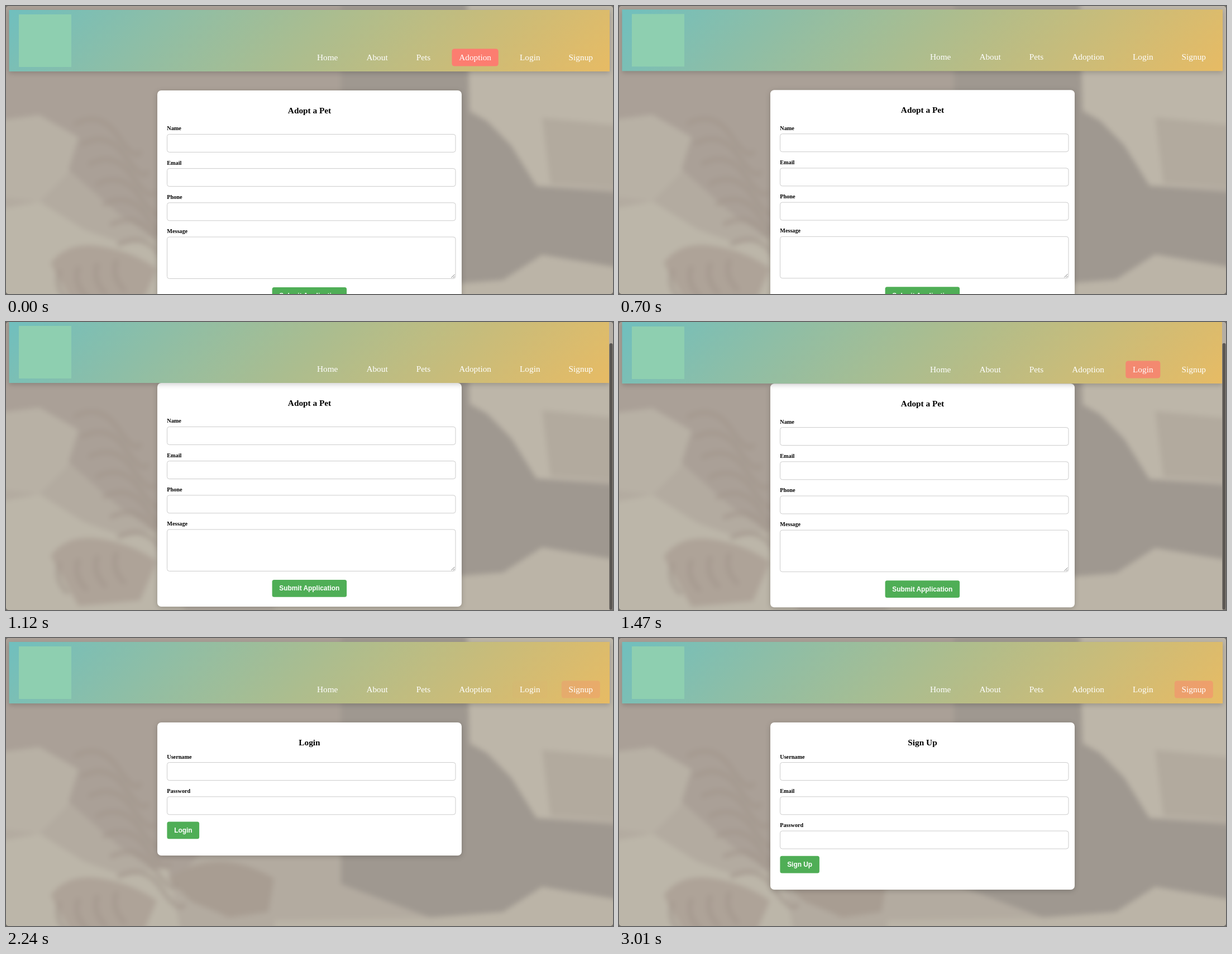
Animation of 1087x515 px, one loop 3.08 s. Source, as an HTML page:

```html
<!DOCTYPE html>
<html lang="en">
<head>
<meta charset="utf-8">
<title>Pet adoption</title>
<style>
  html, body { margin: 0; width: 100%; height: 100%; overflow: hidden; background: #77716a; }
  svg { display: block; width: 1087px; height: 515px; border-radius: 5px; }
  text { font-family: "Liberation Serif", Times, serif; }
  #nav text { font-size: 15.3px; fill: #fff; }
  #nav rect { fill: #fc7d70; }
  .title { font-size: 15.3px; font-weight: bold; text-anchor: middle; }
  .label { font-size: 10.2px; font-weight: bold; }
  .field { fill: #fff; stroke: #ccc; stroke-width: 1; }
  .card { fill: #fff; filter: drop-shadow(0 2px 5px rgba(0, 0, 0, .2)); }
  .button { fill: #4fae56; }
  .caption { font: bold 11.9px "Liberation Sans", Arial, sans-serif; fill: #fff; }
  .grip { stroke: #777; stroke-width: 1; }
  #header { filter: drop-shadow(0 3px 4px rgba(0, 0, 0, .18)); }
  #photo { filter: blur(5px); }
  #fur { fill: none; stroke: #a3978d; stroke-width: 9; stroke-linecap: round; opacity: .6; }
</style>
</head>
<body>
<svg id="stage" viewBox="0 0 1087 515" xmlns="http://www.w3.org/2000/svg">
  <defs>
    <linearGradient id="bar" gradientUnits="userSpaceOnUse" x1="246.5" y1="-234.5" x2="839.5" y2="358.5">
      <stop offset="0" stop-color="#70bfbe"/>
      <stop offset=".5" stop-color="#abbd8f"/>
      <stop offset="1" stop-color="#e7bb64"/>
    </linearGradient>
  </defs>
  <rect width="1087" height="515" fill="#b5aea2"/>
  <g id="backdrop">
    <g id="photo">
      <rect x="-30" y="-30" width="1150" height="640" fill="#b3aba0"/>
      <path fill="#aaa097" d="M-20-20H620V160L420 300 300 440 200 370 120 300 60 230 -20 200Z"/>
      <path fill="#b8b1a5" d="M-20 205 60 195 130 235 110 300 60 350 -20 340Z"/>
      <path fill="#bcb6a9" d="M-20 365 60 350 140 400 210 425 290 410 320 560 -20 580Z"/>
      <path fill="#aea398" d="M80 460Q110 420 170 430T270 470L240 540 130 550Z"/>
      <path fill="#a89d92" d="M290 430Q380 370 480 430L470 490 400 500 330 470Z"/>
      <path fill="#9f9890" d="M600-20H830V190L860 205 905 250 950 322 1110 335V470L960 445 890 490 760 500 600 440Z"/>
      <path fill="#bdb6a9" d="M825-20H1110V325L950 322 905 250 865 208 830 185Z"/>
      <path fill="#b2aa9e" d="M960 200 1110 215V325L975 318Z"/>
      <path fill="#bbb4a7" d="M480 505 760 500 890 490 960 445 1110 470V600H480Z"/>
      <g id="fur"></g>
    </g>
  </g>
  <g id="pages"></g>
  <g id="header">
    <rect x="5.5" y="7" width="1075.5" height="110" fill="url(#bar)"/>
    <rect x="23" y="15" width="94" height="94" fill="#8ecfb0"/>
    <g id="nav"></g>
  </g>
  <g id="scrollbar">
    <rect x="1080" width="7" height="515" fill="#b5aea3"/>
    <rect id="thumb" x="1080.5" width="6" height="477" rx="3" fill="#5b5753"/>
  </g>
</svg>
<script>
const LOOP = 3080, STEP = 70, FADE = 300, MAX_SCROLL = 41;
const $ = id => document.getElementById(id);

function add(parent, tag, attrs, text) {
  const node = document.createElementNS("http://www.w3.org/2000/svg", tag);
  for (const key in attrs) node.setAttribute(key, attrs[key]);
  if (text) node.textContent = text;
  return parent.appendChild(node);
}

const box = (parent, cls, x, y, width, height, rx) =>
  add(parent, "rect", { class: cls, x, y, width, height, rx });

// Striped coat on the left of the backdrop
for (let i = 0; i < 7; i++) {
  const x = 125 + 13 * i, y = 210 + 36 * i;
  add($("fur"), "path", { d: `M${x} ${y}q45 -22 75 22t40 30` });
}
for (let i = 0; i < 4; i++) {
  add($("fur"), "path", { d: `M${95 + 34 * i} ${475 - 6 * i}q-8 28 14 50` });
}

// Navigation
let navX = 557;
const pills = {};
for (const [name, width] of [["Home", 37.4], ["About", 38.3], ["Pets", 25.5],
                             ["Adoption", 57.8], ["Login", 36.6], ["Signup", 43.4]]) {
  pills[name] = box($("nav"), "pill", navX - 12.75, 76.5, width + 25.5, 31, 4.5);
  add($("nav"), "text", { x: navX, y: 97 }, name);
  navX += width + 51;
}

// Form pages
function makePage({ title, labels, top, bottom, button, area }) {
  const page = add($("pages"), "g", {});
  box(page, "card", 271, 151, 545, bottom - 151, 7);
  add(page, "text", { class: "title", x: 543.5, y: 192 }, title);
  labels.forEach((label, i) => {
    const y = top + 61.2 * i, tall = area && i === labels.length - 1;
    add(page, "text", { class: "label", x: 288.3, y: y - 7 }, label);
    box(page, "field", 288.5, y, 516.5, tall ? 74.5 : 32, 4);
    if (tall) add(page, "path", { class: "grip", d: `M797.5 ${y + 73}l6-6m-2.5 6l2.5-2.5` });
  });
  const [caption, x, y, width] = button;
  box(page, "button", x, y, width, 30.7, 3.5);
  add(page, "text", { class: "caption", x: x + 12.75, y: y + 19.4 }, caption);
  return page;
}

const pages = [
  { from: 0, node: makePage({ title: "Adopt a Pet", labels: ["Name", "Email", "Phone", "Message"],
      top: 229.4, bottom: 551, button: ["Submit Application", 476.6, 503, 133.5], area: true }) },
  { from: 1820, node: makePage({ title: "Login", labels: ["Username", "Password"],
      top: 222.6, bottom: 389, button: ["Login", 288.4, 328.5, 57.7] }) },
  { from: 2660, node: makePage({ title: "Sign Up", labels: ["Username", "Email", "Password"],
      top: 222.6, bottom: 450, button: ["Sign Up", 288.4, 389.7, 70.5] }) }
];

// Motion
const ramp = (t, from, to) => Math.min(1, Math.max(0, (t - from) / (to - from)));
const smooth = x => x * x * (3 - 2 * x);
const ease = x => 1 - (1 - x) ** 2.2;
const hover = (t, on, off) => ease(ramp(t, on, on + FADE)) - ease(ramp(t, off, off + FADE));
const shift = (node, y) => node.setAttribute("transform", `translate(0 ${y})`);

function scrollAt(t) {
  if (t >= 1820) return 0;
  return 42 * smooth(ramp(t, 665, 1120)) - 1.2 * ramp(t, 1190, 1330);
}

function render(t) {
  const scroll = scrollAt(t);
  shift($("backdrop"), -scroll);
  shift($("pages"), -scroll);
  shift($("header"), -Math.min(scroll, 7) - Math.max(0, scroll - MAX_SCROLL));

  pages.forEach(({ from, node }, i) => {
    const next = pages[i + 1];
    const shown = t >= from && (!next || t < next.from);
    node.setAttribute("display", shown ? "inline" : "none");
  });

  const glow = {
    Adoption: hover(t, -400, 40),
    Login: hover(t, 130, 230) + hover(t, 1315, 2000),
    Signup: hover(t, 2200, 2919)
  };
  for (const name in pills) pills[name].setAttribute("opacity", glow[name] || 0);

  $("scrollbar").setAttribute("opacity", t > 700 ? 1 - ramp(t, 1500, 1680) : 0);
  $("thumb").setAttribute("y", Math.min(scroll, MAX_SCROLL) * 515 / 556);
}

const start = performance.now();
function tick() {
  const t = (performance.now() - start) % LOOP;
  render(Math.floor(t / STEP) * STEP);
  requestAnimationFrame(tick);
}
tick();
</script>
</body>
</html>
```
